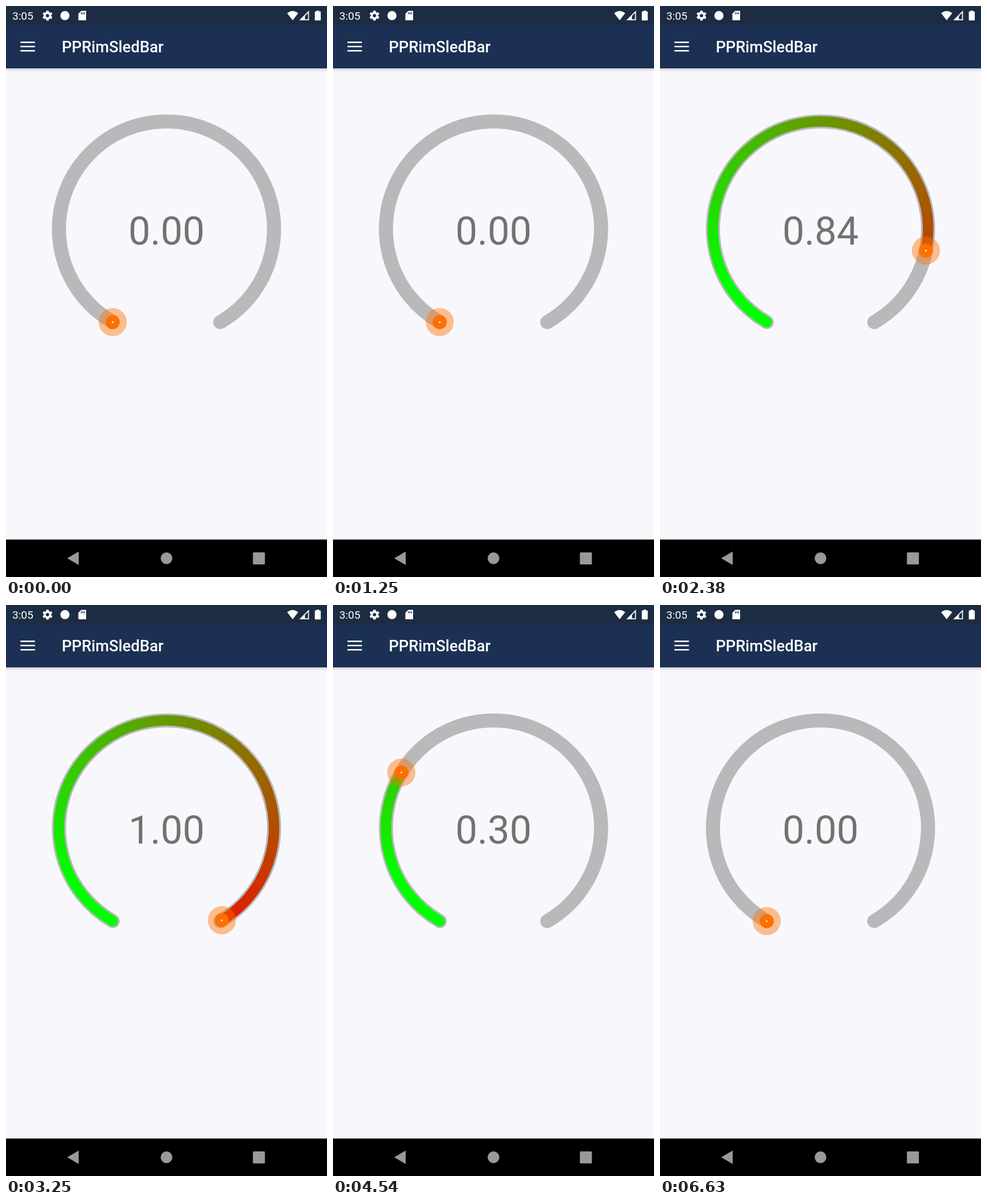
Write an HTML page with a canvas that moves like this. It is 561 by 998 pixels and loops after 6.72 s.

```html
<!DOCTYPE html>
<html lang="en">
<head>
<meta charset="utf-8">
<title>Arc slider</title>
<style>
  html, body { margin: 0; width: 100%; height: 100%; overflow: hidden; background: #f8f8fc; }
  canvas { display: block; width: 561px; height: 998px; }
</style>
</head>
<body>
<canvas id="stage"></canvas>
<script>
const W = 561, H = 998, LOOP = 6720;
const CX = 280.5, CY = 389.7, R = 188;
const START = 120, SWEEP = 300;
const BAR = '#1b3053', STATUS = '#1c2c43';

const canvas = document.getElementById('stage');
const ctx = canvas.getContext('2d');
const dpr = window.devicePixelRatio || 1;
canvas.width = W * dpr;
canvas.height = H * dpr;
ctx.scale(dpr, dpr);

const rad = deg => deg * Math.PI / 180;

// Drag gesture: [time in ms, slider value]
const keys = [
  [1270, 0], [2380, 0.838], [2700, 1], [3200, 1],
  [3920, 0.657], [4540, 0.304], [5150, 0]
];
const slopes = keys.slice(1).map((k, i) => (k[1] - keys[i][1]) / (k[0] - keys[i][0]));
const tangents = keys.map((k, i) => {
  const a = slopes[i - 1] || 0, b = slopes[i] || 0;
  return a * b > 0 ? 2 * a * b / (a + b) : 0;
});

// Monotone cubic interpolation between the keys
function valueAt(t) {
  const i = keys.findIndex((k, n) => n < keys.length - 1 && t >= k[0] && t < keys[n + 1][0]);
  if (i < 0) return 0;
  const [t0, v0] = keys[i], [t1, v1] = keys[i + 1];
  const d = t1 - t0, u = (t - t0) / d, u2 = u * u, u3 = u2 * u;
  return (2 * u3 - 3 * u2 + 1) * v0 + (u3 - 2 * u2 + u) * d * tangents[i]
    + (3 * u2 - 2 * u3) * v1 + (u3 - u2) * d * tangents[i + 1];
}

const sweepPaint = ctx.createConicGradient(rad(150), CX, CY);
sweepPaint.addColorStop(0, '#00ff00');
sweepPaint.addColorStop(5 / 6, '#ff0000');
sweepPaint.addColorStop(5 / 6, '#00ff00');
sweepPaint.addColorStop(1, '#00ff00');

function rect(x, y, w, h, color) {
  ctx.fillStyle = color;
  ctx.fillRect(x, y, w, h);
}

function disc(x, y, r, color) {
  ctx.fillStyle = color;
  ctx.beginPath();
  ctx.arc(x, y, r, 0, 2 * Math.PI);
  ctx.fill();
}

function poly(color, ...pts) {
  ctx.fillStyle = color;
  ctx.beginPath();
  pts.forEach(([x, y]) => ctx.lineTo(x, y));
  ctx.closePath();
  ctx.fill();
}

function rounded(x, y, w, h, r, color) {
  ctx.fillStyle = color;
  ctx.beginPath();
  ctx.roundRect(x, y, w, h, r);
  ctx.fill();
}

function text(str, x, y, font, color, align = 'left') {
  ctx.font = font + ' Roboto, sans-serif';
  ctx.fillStyle = color;
  ctx.textAlign = align;
  ctx.fillText(str, x, y);
}

function arc(span, width, paint) {
  ctx.strokeStyle = paint;
  ctx.lineWidth = width;
  ctx.lineCap = 'round';
  ctx.beginPath();
  ctx.arc(CX, CY, R, rad(START), rad(START + span));
  ctx.stroke();
}

function gear(x, y) {
  ctx.save();
  ctx.translate(x, y);
  for (let i = 0; i < 6; i++) {
    ctx.rotate(Math.PI / 3);
    poly('#fff', [-2.9, -5], [-1.8, -8.7], [1.8, -8.7], [2.9, -5]);
  }
  ctx.restore();
  disc(x, y, 6.5, '#fff');
  disc(x, y, 2.9, STATUS);
}

function statusBar() {
  rect(0, 0, W, 33, STATUS);
  text('3:05', 11, 24, '19.1px', '#fff');
  gear(72.5, 16.8);
  disc(103, 16.8, 8, '#fff');

  // Memory card
  poly('#fff', [131.5, 8.5], [140, 8.5], [140, 25], [126.5, 25], [126.5, 13.5]);
  for (let i = 0; i < 3; i++) rect(131 + i * 2.8, 11, 1.4, 3.5, STATUS);

  // Wireless fan
  ctx.fillStyle = '#fff';
  ctx.beginPath();
  ctx.moveTo(501, 25);
  ctx.lineTo(491.3, 12.6);
  ctx.quadraticCurveTo(501, 5, 510.7, 12.6);
  ctx.fill();

  // Signal wedge
  poly('#fff', [529.5, 8], [529.5, 25], [512.5, 25]);
  poly(STATUS, [527.8, 12.3], [527.8, 23.3], [522.5, 23.3], [522.5, 17.6]);

  // Battery
  rect(542.7, 8, 4.4, 3, '#fff');
  rounded(539.7, 9.6, 10.4, 15.6, 1, '#fff');
}

function toolbar() {
  const shade = ctx.createLinearGradient(0, 109, 0, 115);
  shade.addColorStop(0, 'rgba(0,0,0,.14)');
  shade.addColorStop(1, 'rgba(0,0,0,0)');
  rect(0, 109, W, 6, shade);
  rect(0, 33, W, 76, BAR);
  for (let i = 0; i < 3; i++) rect(25.2, 62.2 + i * 7.4, 25.4, 2.5, '#fff');
  text('PPRimSledBar', 97.4, 81.3, '500 27.3px', '#fff');
}

function navBar() {
  const grey = '#999996';
  rect(0, 932.5, W, H - 932.5, '#000');
  poly(grey, [107, 965.2], [127, 953.5], [127, 977]);
  disc(280.5, 965.3, 10.2, grey);
  rounded(431.5, 955, 21, 21, 1.5, grey);
}

function slider(value) {
  arc(SWEEP, 24.5, '#b9b9bb');
  if (value > 0) arc(SWEEP * value, 18.4, sweepPaint);
  const a = rad(START + SWEEP * value);
  const x = CX + R * Math.cos(a), y = CY + R * Math.sin(a);
  disc(x, y, 24.6, 'rgba(255,111,0,.43)');
  disc(x, y, 12.3, '#ff6f00');
  disc(x, y, 1.5, '#fff');
  text(value.toFixed(2), CX, 417, '68.2px', '#727272', 'center');
}

function draw(t) {
  rect(0, 0, W, H, '#f8f8fc');
  toolbar();
  statusBar();
  slider(valueAt(t));
  navBar();
}

const begin = performance.now();
function tick() {
  draw((performance.now() - begin) % LOOP);
  requestAnimationFrame(tick);
}
tick();
</script>
</body>
</html>
```
